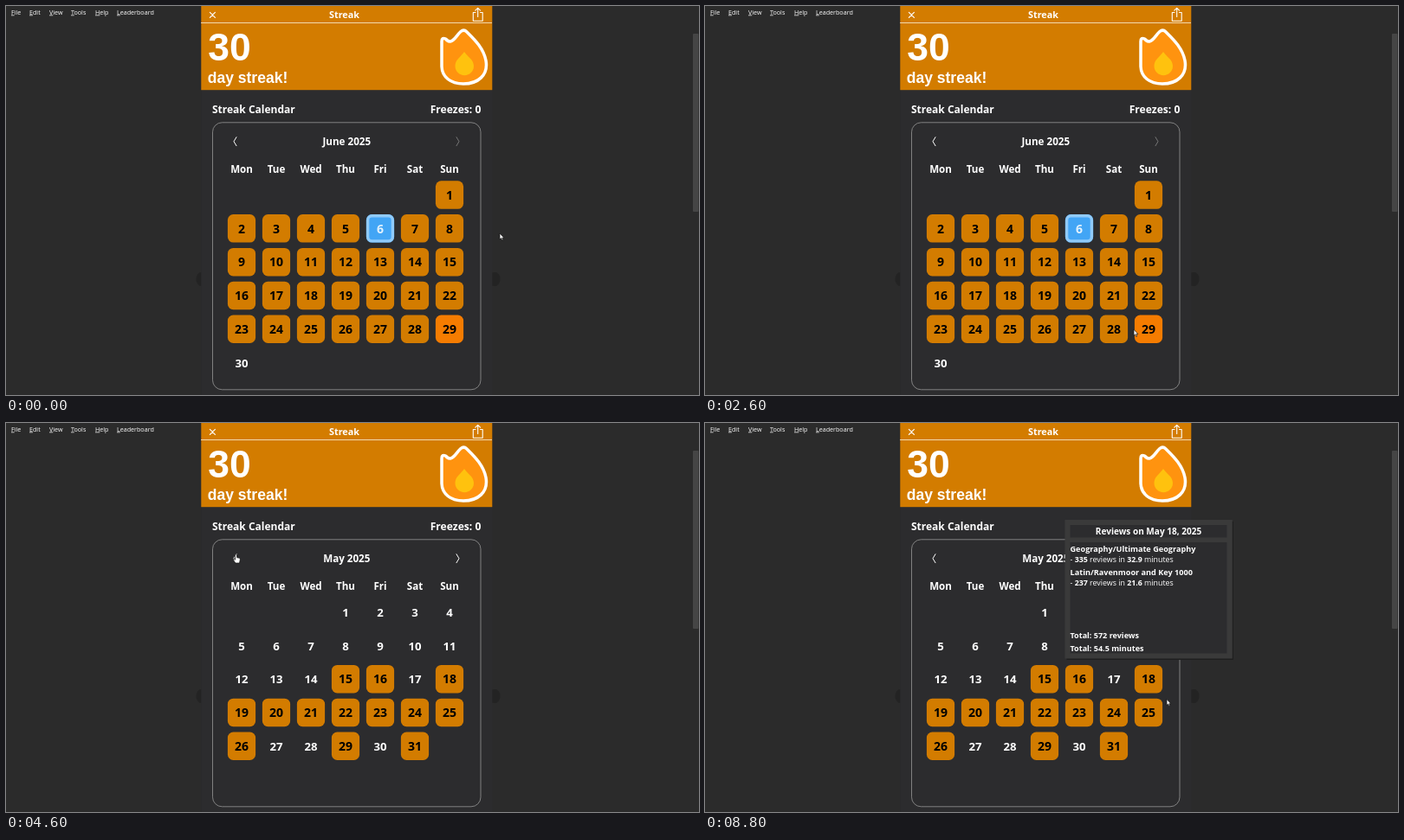
These frames come from a looping animation (800x450 px, 8.9 s). An HTML page:

```html
<!DOCTYPE html>
<html lang="en">
<head>
<meta charset="utf-8">
<title>Streak calendar</title>
<style>
  html, body { margin: 0; width: 100%; height: 100%; overflow: hidden; background: #2b2b2b; }
  svg { display: block; width: 800px; height: 450px; }
  text { font-family: "Open Sans", "Noto Sans", sans-serif; fill: #fff; white-space: pre; }
  .b { font-weight: 700; }
  .mid { text-anchor: middle; }
  .end { text-anchor: end; }
  .head { font-family: "Liberation Sans", Arial, sans-serif; font-weight: 700; }
  .arabic { font-family: "DejaVu Sans", sans-serif; font-weight: 700; }
  .line { fill: none; stroke: #fff; stroke-linecap: round; stroke-linejoin: round; }
</style>
</head>
<body>
<svg id="stage" viewBox="0 0 800 450"></svg>
<script>
const LOOP = 8900, STEP = 100;
const ORANGE = '#d37c00', PANEL = '#2c2c2e';
const stage = document.getElementById('stage');

function el(tag, attrs, parent = stage, content = '') {
  const node = document.createElementNS('http://www.w3.org/2000/svg', tag);
  for (const key in attrs) node.setAttribute(key, attrs[key]);
  if (content) node.textContent = content;
  parent.append(node);
  return node;
}
const rect = (x, y, width, height, fill, parent, extra) =>
  el('rect', { x, y, width, height, fill, ...extra }, parent);
const text = (x, y, size, cls, content, parent, extra) =>
  el('text', { x, y, 'font-size': size, class: cls, ...extra }, parent, content);
const line = (d, width, parent, extra) =>
  el('path', { d, class: 'line', 'stroke-width': width, ...extra }, parent);
const show = (node, on) => node.setAttribute('visibility', on ? 'visible' : 'hidden');

const colX = col => 272 + col * 40;
const rowY = row => 218.8 + row * 38.8;

function drawWindow() {
  rect(0, 0, 800, 450, '#2b2b2b');
  const menu = [['File', 6], ['Edit', 27], ['View', 50], ['Tools', 75], ['Help', 103], ['Leaderboard', 128]];
  for (const [word, x] of menu) {
    const item = text(x, 9.5, 7.15, '', '');
    el('tspan', { 'text-decoration': 'underline' }, item, word[0]);
    el('tspan', {}, item, word.slice(1));
  }
  rect(793, 32, 6.5, 206, '#454545', stage, { rx: 1 });
  for (const x of [226, 564]) el('ellipse', { cx: x, cy: 316, rx: 6.5, ry: 8, fill: '#232323' });
  rect(225.3, 0, 336, 450, PANEL);
}

function drawHeader() {
  rect(225.3, 0, 336, 97.2, ORANGE);
  line('M225.3 19.5H561.3', 1, stage, { 'stroke-dasharray': '1.4 .6', style: 'stroke-linecap:butt' });
  line('M235.4 7.4l6 6m0-6l-6 6', 1.2);
  text(390.5, 14.4, 10.8, 'b mid', 'Streak');
  line('M542 7.5H539.3V17.2H550.2V7.5H547.5M544.7 12.5V2.5M541.8 5.2l2.9-2.9 2.9 2.9', 1.1);
  text(233.3, 63.3, 44.5, 'head', '30');
  text(232.8, 89, 17.5, 'head', 'day streak!');
  el('path', {
    d: 'M513 41C518 40 520 34 525 29.5Q528.5 26.5 532 30C540 38 551 48 554 63' +
       'C557 80 545 90 528 90C513 90 503.5 82 503 70L503 41Q503 36 507.5 38Q510.5 41.5 513 41Z',
    fill: '#ff930f', stroke: '#fff', 'stroke-width': 3.5, 'stroke-linejoin': 'round'
  });
  el('path', {
    d: 'M529 53C533 59 540 62 540 69.5A10.75 10.75 0 0 1 518.5 69.5C518.5 62 525 59 529 53Z',
    fill: '#ffc20e'
  });
}

function drawFrame() {
  text(238, 123.8, 12, 'b', 'Streak Calendar');
  text(548.3, 123.8, 12.1, 'b end', 'Freezes: 0');
  rect(238.5, 134.8, 309.5, 309, 'none', stage, { rx: 11, stroke: '#8b8b8b', 'stroke-width': 0.9 });
  line('M266 151.7L263 156.7L266 161.7', 1);
  ['Mon', 'Tue', 'Wed', 'Thu', 'Fri', 'Sat', 'Sun'].forEach((name, i) =>
    text(colX(i), 193, 11.6, 'b mid', name));
}

// kind(day) names the look of a day: plain, done, today or frozen.
const looks = {
  done: [ORANGE, '#000'],
  today: ['#f57c00', '#000'],
  frozen: ['#42a5f5', '#e3f2fd']
};
function drawMonth(title, first, days, arrow, kind) {
  const g = el('g', {});
  text(393.3, 160.5, 11.65, 'b mid', title, g);
  line('M520 151.7L523 156.7L520 161.7', 1, g, { style: `stroke:${arrow}` });
  for (let day = 1; day <= days; day++) {
    const slot = first + day - 1;
    const x = colX(slot % 7), y = rowY(Math.floor(slot / 7));
    const look = looks[kind(day)];
    if (look) rect(x - 16.1, y - 16.5, 32.2, 32.5, look[0], g, { rx: 6.5 });
    if (kind(day) === 'frozen')
      rect(x - 14.4, y - 14.8, 28.8, 29.1, 'none', g, { rx: 5, stroke: '#90caf9', 'stroke-width': 3.4 });
    text(x, y + 5, look ? 14 : 13.2, 'b mid', day, g, look && { style: `fill:${look[1]}` });
  }
  return g;
}

function drawPopup({ slot, date, decks = [], total, from, to }) {
  const x = colX(slot % 7) - 96.5, y = rowY(Math.floor(slot / 7)) - 184.4;
  const shadow = el('path', {
    d: 'M194.3 3V161.3H100', transform: `translate(${x} ${y})`,
    fill: 'none', stroke: '#1a1a1a', 'stroke-width': 1
  });
  const g = el('g', { transform: `translate(${x} ${y})` });
  rect(2, 2, 192.5, 160, '#1f1f1f', g);
  rect(0, 0, 193.3, 160.5, '#3a3a3a', g);
  rect(6, 6, 181, 14.5, PANEL, g);
  rect(6, 26, 181, 128.5, PANEL, g);
  text(96.5, 17, 10.05, 'b mid', `Reviews on ${date}`, g);
  if (!decks.length) text(6, 36.8, 8.85, '', 'No reviews on this day.', g);
  decks.forEach(([name, count, minutes, arabic], i) => {
    const top = 36.8 + i * 27;
    text(6, top, 9.15, 'b', name, g);
    if (arabic) text(174, top, 7.8, 'arabic end', arabic, g);
    const row = text(6, top + 12.6, 8.85, '', '', g);
    const parts = ['- ', count, ' reviews in ', minutes, ' minutes'];
    parts.forEach((part, k) => el('tspan', k % 2 ? { class: 'b' } : {}, row, part));
  });
  if (total) {
    text(6, 136.8, 9.05, 'b', `Total: ${total[0]} reviews`, g);
    text(6, 151.8, 9.05, 'b', `Total: ${total[1]} minutes`, g);
  }
  return t => {
    show(shadow, t >= from - STEP && t < from);
    show(g, t >= from && t < to);
  };
}

drawWindow();
drawHeader();
drawFrame();
const june = drawMonth('June 2025', 6, 30, '#777', d =>
  d === 6 ? 'frozen' : d === 29 ? 'today' : d < 29 ? 'done' : 'plain');
const may = drawMonth('May 2025', 3, 31, '#fff', d =>
  [15, 16, 29, 31].includes(d) || (d >= 18 && d <= 26) ? 'done' : 'plain');

const geo = 'Geography/Ultimate Geography';
const popups = [
  { slot: 34, date: 'Jun 29, 2025', from: 1000, to: 2500, total: ['3', '0.1'],
    decks: [['Arabic/Arabic Alphabet', '1', '0.0', 'الحروف العربية'], [geo, '2', '0.1']] },
  { slot: 33, date: 'Jun 28, 2025', from: 3200, to: 3600, total: ['2', '0.1'],
    decks: [[geo, '2', '0.1']] },
  { slot: 9, date: 'May 07, 2025', from: 5900, to: 6600 },
  { slot: 19, date: 'May 17, 2025', from: 7100, to: 7800 },
  { slot: 20, date: 'May 18, 2025', from: 8000, to: LOOP, total: ['572', '54.5'],
    decks: [[geo, '335', '32.9'], ['Latin/Ravenmoor and Key 1000', '237', '21.6']] }
].map(drawPopup);

const pointer = el('g', {});
const ink = { fill: '#fff', stroke: '#111', 'stroke-width': 0.7, 'stroke-linejoin': 'round' };
const arrow = el('path', { ...ink, d: 'M0 0V7L1.6 5.6L2.7 8.1L3.9 7.6L2.8 5.2H4.9Z' }, pointer);
const hand = el('path', {
  ...ink,
  d: 'M-1 0.8Q0 -0.6 1 0.8V3.6L4 4.3Q5 4.7 4.8 6L4 10H-0.6L-3 6.6Q-3 5.2 -1 6.2Z'
}, pointer);

// Pointer path: time, x, y
const path = [
  [0, 570, 263], [600, 515, 370], [2300, 515, 369], [2900, 475, 379.5], [3300, 475, 379.5],
  [4100, 273, 244], [4400, 265.5, 152], [4900, 265.5, 152], [5700, 359, 264.5],
  [6400, 359, 264.5], [6900, 476, 297], [7600, 476, 297], [7900, 516, 302],
  [8400, 516, 302], [8800, 533, 319.5]
];
function pointerAt(t) {
  const i = path.findIndex(p => p[0] > t);
  if (i < 0) return path[path.length - 1].slice(1);
  const [t0, x0, y0] = path[i - 1], [t1, x1, y1] = path[i];
  const u = (t - t0) / (t1 - t0), e = u * u * (3 - 2 * u);
  return [x0 + (x1 - x0) * e, y0 + (y1 - y0) * e];
}

function render(now) {
  const t = Math.floor((now % LOOP) / STEP) * STEP;
  show(june, t < 4600);
  show(may, t >= 4600);
  popups.forEach(update => update(t));
  pointer.setAttribute('transform', `translate(${pointerAt(t).join(' ')})`);
  const pressing = t >= 4400 && t <= 5000;
  show(hand, pressing);
  show(arrow, !pressing);
}

const start = performance.now();
function tick() {
  render(performance.now() - start);
  requestAnimationFrame(tick);
}
tick();
</script>
</body>
</html>
```
